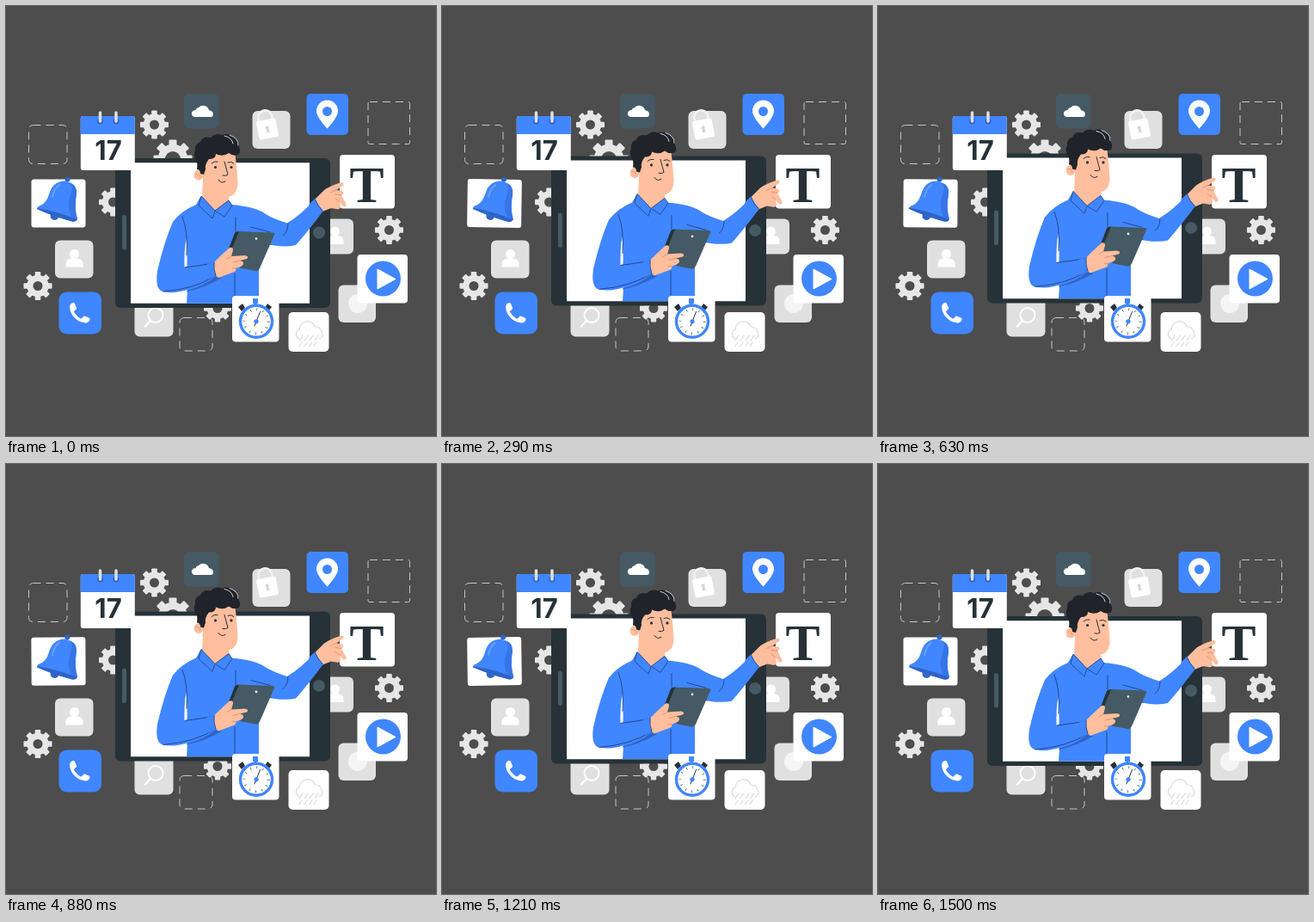
Recreate the animation shown at these times as an HTML page. Size 500 by 500 pixels, loop 1.54 s.

```html
<!DOCTYPE html>
<html lang="en">
<head>
<meta charset="utf-8">
<title>Floating tablet</title>
<style>
  html, body { margin: 0; height: 100%; overflow: hidden; background: #4d4d4d; }
  svg { display: block; width: 100vw; height: 100vh; }
  .blue { fill: #4086ff; }
  .deep { fill: #2f64c4; }
  .dark { fill: #263238; }
  .slate { fill: #455a64; }
  .grey { fill: #e0e0e0; }
  .white { fill: #fff; }
  .skin { fill: #ffbe9d; }
  .line { fill: none; stroke: #263238; stroke-width: 1; stroke-linecap: round; stroke-linejoin: round; }
  .fold { stroke: #24488f; }
  .crease { stroke: #e09572; }
  .collar { stroke: #24488f; stroke-width: .9; stroke-linejoin: round; }
  .dash { fill: none; stroke: #c7c7c7; stroke-dasharray: 9 6; }
</style>
</head>
<body>
<svg viewBox="0 0 500 500">
  <defs>
    <g id="user" class="white">
      <circle cy="-5" r="5.5"/>
      <path d="M-10 10V6C-10 2-6 0-3 0H3C6 0 10 2 10 6V10Z"/>
    </g>
    <clipPath id="screen"><path d="M145 100H400V345.800H145Z"/></clipPath>
  </defs>

  <rect class="dash" x="26.500" y="138.500" width="44.500" height="45" rx="5"/>
  <rect class="dash" x="421" y="111.500" width="48.500" height="49" rx="2"/>
  <rect class="dash" x="202" y="362.500" width="38" height="38.500" rx="5"/>
  <g id="gears" fill="#e6e6e6"></g>

  <!-- tiles behind the tablet -->
  <rect class="slate" x="207" y="102" width="40.500" height="40.500" rx="6"/>
  <path class="white" d="M219 129A4 4 0 0 1 218 121.500Q220 121 220.500 121A4 4 0 0 1 224 118A7 7 0 0 1 236 121Q241 122 241 126Q241 129 238 129Z"/>
  <rect class="grey" x="286.500" y="122" width="44" height="44" rx="6"/>
  <g transform="rotate(-11 304 143)">
    <path d="M296 133V129A8 8 0 0 1 312 129V133" fill="none" stroke="#f2f2f2" stroke-width="2.500"/>
    <rect class="white" x="292.500" y="132" width="23" height="22" rx="2.500"/>
    <circle cx="304" cy="141.500" r="2" fill="#d4d4d4"/>
    <path d="M303 142H305L306 147H302Z" fill="#d4d4d4"/>
  </g>
  <rect class="blue" x="349.500" y="102" width="48.500" height="48" rx="5"/>
  <path class="white" d="M373.500 142.500Q361 129 361 122A12.500 12.500 0 0 1 386 122Q386 129 373.500 142.500Z"/>
  <circle class="blue" cx="373.500" cy="122.500" r="5.500"/>
  <rect class="grey" x="360" y="247.500" width="44" height="41" rx="6"/>
  <use href="#user" x="382.500" y="267"/>
  <rect class="grey" x="57" y="272.500" width="44.500" height="44" rx="6"/>
  <use href="#user" x="79.500" y="293.500"/>
  <rect class="grey" x="149.500" y="340" width="45" height="44.500" rx="6"/>
  <g fill="none" stroke="#fff" stroke-width="1.800" stroke-linecap="round">
    <circle cx="174" cy="359.500" r="8.500"/>
    <path d="M167.500 366.500L162 372.500" stroke-width="2.500"/>
  </g>
  <rect class="grey" x="386.500" y="324.500" width="43.500" height="43.500" rx="6"/>
  <circle cx="409" cy="346" r="11" fill="#f5f5f5"/>
  <rect class="blue" x="61.500" y="332.500" width="49.500" height="49" rx="9"/>
  <path class="white" transform="translate(70.200 341.200) scale(1.300)" d="M6.620 10.790c1.440 2.830 3.760 5.140 6.590 6.590l2.200-2.200c.27-.27.67-.36 1.020-.24l3.570 1.400c.9.400 1.200 1 1 1.800C20.500 20 19 21 17 21C9 20.500 3 13 3 7C3 5 4 3.500 5.800 3c.9-.2 1.500.1 1.900 1l1.400 3.600c.11.350.03.740-.25 1.020z"/>

  <g class="float">
    <rect class="dark" x="127" y="177" width="250" height="174" rx="6"/>
    <path class="white" d="M145 182.200H353V345.800H145Z"/>
    <rect class="slate" x="135" y="243" width="5" height="40.500" rx="2.500"/>
    <circle class="slate" cx="364" cy="263.500" r="7"/>

    <g clip-path="url(#screen)">
      <!-- shirt -->
      <path class="blue" d="M226 222L221 231Q204 238 194 251Q184 274 176 308Q173 329 182 332Q194 335 211 330L210 346H294V275Q323 282 337 278Q352 261 369 238L359 225Q344 242 327 252.500Q310 247 302 242Q290 233 261 231L257 225Z"/>
      <path class="white" d="M209.500 270Q211 290 210.500 303L207.500 304Q207 286 209.500 270Z"/>
      <path class="deep" d="M210 331Q230 326 243 315L251 316Q231 328 210 332Z"/>
      <path class="line fold" d="M205 245Q212 262 210 290M208 304Q225 302 242 299M183 332Q220 329 243 314M267 246V262M266 311V345M285 257L307 263M294 275L308 277M328 253Q328 263 322 267"/>

      <!-- neck and head -->
      <path class="skin" d="M229 200L228 222L243 239L259 229L259 216Z"/>
      <path class="blue collar" d="M227 221L224 232L240 247L243 238ZM259 226L243 238L254 245L263 232Z"/>
      <path class="skin" d="M229 174L265 163Q268 180 269.500 206Q269 220 259 221.500Q243 221 229 207Z"/>
      <ellipse class="skin" cx="224" cy="196.500" rx="5.500" ry="6"/>
      <path class="line crease" d="M221 195Q225 194 226 199"/>
      <path fill="#20242a" d="M230 196L226 195Q226 190 222 190Q223 182 221 180Q217 174 220 168Q219 160 226 158Q229 151 238 153Q244 147 251 150Q260 147 265 153Q272 157 271 164Q274 170 270 173Q264 175 259 171Q252 176 244 172Q244 178 236 178Q231 184 232 190Z"/>
      <path d="M254 151Q263 153 264 160M260 150Q271 154 270 162" fill="none" stroke="#dfe5e8" stroke-width=".9" stroke-linecap="round"/>
      <path class="line" d="M239 183Q242 180 246 181M258 182Q262 180 265 183" stroke-width="1.500"/>
      <circle class="dark" cx="243.500" cy="187.500" r="1.600"/>
      <circle class="dark" cx="262" cy="187.500" r="1.600"/>
      <path class="line" d="M254 181L258 196Q256 198 252 197M247 202Q250 207 255 204"/>

      <!-- handheld tablet -->
      <path class="slate" d="M270 262L310 263.500Q313 264 312 266L295 305Q293 309 290 308L274 305L258 297Z"/>
      <path class="dark" d="M266 264Q267 262 271 262L259 292L256 290Z"/>
      <circle class="white" cx="291" cy="270.500" r="1.300"/>
      <path class="skin" d="M241 299L249 291L260 281Q264 280 264 284L262 291L278 290Q283 291 280 294L272 296L275 297Q278 300 273 303L267 305Q269 308 263 310L247 316L242 312Z"/>
      <path class="line crease" d="M262 291L257 294M272 296L264 298M268 305L263 305"/>
      <path class="blue" d="M234 300L242 298Q241 306 244 314L235 318Z"/>
      <path class="line fold" d="M242 298Q241 306 244 314"/>
    </g>
  </g>

  <!-- tiles in front of the tablet -->
  <rect class="white" x="86.800" y="128" width="63" height="63" rx="3"/>
  <path class="blue" d="M86.800 149V131Q86.800 128 89.800 128H146.800Q149.800 128 149.800 131V149Z"/>
  <g class="deep"><circle cx="109.500" cy="134" r="3.500"/><circle cx="128" cy="134" r="3.500"/></g>
  <path d="M109.500 124V134M128 124V134" stroke="#e0e0e0" stroke-width="3.500" stroke-linecap="round"/>
  <text class="dark" x="119" y="178.500" text-anchor="middle" font-family="Inter, sans-serif" font-weight="700" font-size="31">17</text>

  <g id="bell">
    <rect class="white" x="29.500" y="201.500" width="63" height="56" rx="3"/>
    <circle class="deep" cx="56.500" cy="244" r="5"/>
    <circle class="deep" cx="71.500" cy="201.500" r="3"/>
    <path class="blue" d="M36 236Q36 233 40 232Q47 229 50 219Q54 204 68 203.500Q83 206 82 218Q79 235 83 248Q81 252 75 250Q53 244 36 236Z"/>
    <path class="deep" d="M36 235Q57 238 83 248Q81 252 75 250Q53 244 36 236Z"/>
    <path d="M62 208Q56 212 54 222" fill="none" stroke="#6aa2ff" stroke-width="2" stroke-linecap="round"/>
    <path d="M75 206Q79 211 75 220Q70 233 76 245L83 248Q79 235 82 218Q82 208 75 206Z" fill="#3774e4"/>
  </g>

  <rect class="white" x="388" y="173" width="64" height="62.500" rx="4"/>
  <text class="dark" x="419.500" y="227.500" text-anchor="middle" font-family="Liberation Serif, serif" font-weight="700" font-size="60">T</text>

  <rect class="white" x="408.500" y="289" width="58.500" height="56.500" rx="4"/>
  <circle class="blue" cx="438.500" cy="317" r="20.500"/>
  <path class="white" d="M432 306L453 317.500L432 329Z" stroke="#fff" stroke-linejoin="round"/>

  <rect class="white" x="328.500" y="356" width="47" height="46" rx="5"/>
  <path d="M341 387A6 6 0 0 1 341 376Q342 368 349 367Q357 366 359 373Q366 373 367 379A5 5 0 0 1 364 387M345 383L341 389M351 383L347 389M357 383L353 389M363 383L359 389M344 391L341 395.500M350 391L347 395.500M356 391L353 395.500M361 391L358 395.500" fill="none" stroke="#d9d9d9" stroke-width="1.200" stroke-linecap="round"/>

  <rect class="white" x="263" y="337" width="54.500" height="53.500" rx="4"/>
  <path class="dark" d="M270 350L275 346L278 351L274 355ZM309 350L304 346L301 351L305 355Z"/>
  <path class="blue" d="M287 340H293V346H291.500V350H288.500V346H287Z"/>
  <circle cx="291" cy="366.800" r="18.500" fill="#fff" stroke="#4086ff" stroke-width="3.400"/>
  <circle cx="291" cy="366.800" r="14" fill="none" stroke="#455a64" stroke-width="3" stroke-dasharray=".8 6.530"/>
  <path class="line" d="M289 372L295.500 355.500" stroke-width="1.600"/>
  <circle class="blue" cx="291" cy="366.800" r="2.600"/>

  <!-- pointing hand -->
  <g class="float">
    <path class="skin" d="M359 225L370 214Q377 209 390 205Q394 205.500 392 208.500L384 214L391 215Q394 218 390 220L395.500 230Q396 234 392 233L388 228L389 234Q388 237 384 236L378 235L368 239Z"/>
    <path class="line crease" d="M384 214L377 217M390 220L383 219M388 228L383 224"/>
    <path class="blue" d="M359 224L352 231L361 247L369 238Q362 232 359 224Z"/>
    <path class="line fold" d="M359.500 225Q362 232 368 238"/>
  </g>
</svg>
<script>
  const LOOP = 1540, FPS = 24, STEPS = 36, LIFT = 6.7;

  const gear = (x, y, r, hole) => {
    const tooth = a => `<rect x="${-r * .2}" y="${-r}" width="${r * .4}" height="${r * .5}" rx="1" transform="rotate(${a})"/>`;
    const teeth = Array.from({ length: 8 }, (_, i) => tooth(i * 45)).join('');
    return `<g transform="translate(${x} ${y})">${teeth}<circle r="${r * .77}"/><circle r="${hole}" fill="#4d4d4d"/></g>`;
  };
  document.getElementById('gears').innerHTML =
    gear(172.5, 138, 16.5, 5.5) + gear(194, 178, 22.5, 9) + gear(124.5, 228, 16.5, 5.5) +
    gear(246, 351.5, 16, 5.5) + gear(445.5, 260.5, 16.5, 5.5) + gear(37, 325.5, 16.5, 5.5);

  const floats = document.querySelectorAll('.float');
  const bell = document.getElementById('bell');

  function draw() {
    const step = Math.min(STEPS, Math.floor((performance.now() % LOOP) * FPS / 1000 + .1));
    const phase = step / STEPS;
    const lift = LIFT * (1 - Math.abs(2 * phase - 1));
    const tilt = Math.asin(Math.sin(phase * 2 * Math.PI)) * 2 / Math.PI;
    floats.forEach(g => g.setAttribute('transform', `translate(0 ${-lift})`));
    bell.setAttribute('transform', `rotate(${tilt} 61 229)`);
    requestAnimationFrame(draw);
  }
  draw();
</script>
</body>
</html>
```
